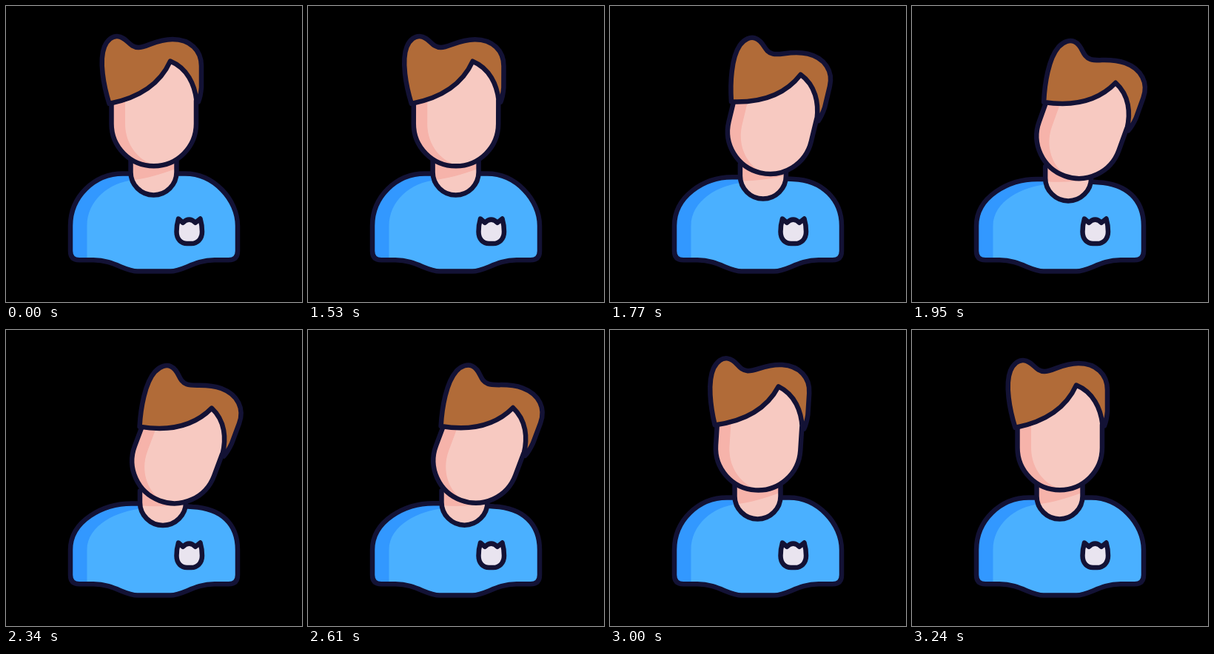
Write an HTML page that moves like this. It is 400 by 400 pixels and loops after 3270 ms.

```html
<!DOCTYPE html>
<html lang="en">
<head>
<meta charset="utf-8">
<title>Head tilt</title>
<style>
  html, body { margin: 0; width: 100%; height: 100%; overflow: hidden; background: #000; }
  svg { display: block; width: 100vw; height: 100vh; }
  .line { stroke: #131235; stroke-width: 6.5; stroke-linecap: round; stroke-linejoin: round; }
</style>
</head>
<body>
<svg viewBox="0 0 400 400">
  <defs>
    <clipPath id="shirtClip"><path id="shirtShape"/></clipPath>
    <clipPath id="neckClip"><path d="M168.5 205V224.5A31 31 0 0 0 230.5 224.5V205Z"/></clipPath>
    <clipPath id="faceClip"><path d="M142.5 110V159A57.25 57.25 0 0 0 257 159V128C252 100 240 80 222 69Z"/></clipPath>
  </defs>

  <path id="shirtFill" fill="#4ab0ff"/>
  <path id="shirtShade" fill="#3298ff" clip-path="url(#shirtClip)"/>
  <path id="shirtLine" class="line" fill="none"/>
  <path class="line" fill="#e9e4ef" d="M233 287.5L239 292.8Q247.5 284.5 256 292.8L262.5 287.5Q265 296 265 305C265 315.5 258 321 250.5 321H244.5C237 321 230.5 315.5 230.5 305Q230.5 296 233 287.5Z"/>

  <g id="neck">
    <path fill="#f7c9c1" d="M168.5 208V224.5A31 31 0 0 0 230.5 224.5V208Z"/>
    <g clip-path="url(#neckClip)">
      <path id="neckShade" fill="#f6b3aa" d="M150 190V237C180 236 210 229 248 212V190Z"/>
    </g>
    <path class="line" fill="none" d="M168.5 209V224.5A31 31 0 0 0 230.5 224.5V209"/>
  </g>

  <g id="head">
    <path fill="#f7c9c1" d="M142.5 110V159A57.25 57.25 0 0 0 257 159V128C252 100 240 80 222 69Z"/>
    <path fill="#f6b3aa" clip-path="url(#faceClip)" d="M140 100H161V159C161 188 180 211 205 216L190 225H140Z"/>
    <path class="line" fill="none" d="M142.5 128V159A57.25 57.25 0 0 0 257 159V128"/>
    <path class="line" fill="#b16b38" d="M139.5 132C132 108 125.5 74 133 55C137 45.5 144 40.5 150.5 41C164 42 166 56 179 56C190 56 203 45 225 45C249 45 264 60 264 81V110Q263 122 260 129.5L257.5 128C255 106 245 84 222 74.5C207 108 175 125 139.5 132Z"/>
  </g>
</svg>
<script>
  const LOOP = 3270, STEP = 30;
  const $ = id => document.getElementById(id);

  // Cubic-bezier ease (.33, 0, .4, 1), solved by bisection.
  function ease(x) {
    if (x <= 0) return 0;
    if (x >= 1) return 1;
    let lo = 0, hi = 1;
    for (let i = 0; i < 24; i++) {
      const s = (lo + hi) / 2, r = 1 - s;
      if (3 * r * r * s * .33 + 3 * r * s * s * .4 + s ** 3 < x) lo = s;
      else hi = s;
    }
    return lo * lo * (3 - 2 * lo);
  }

  // Lean to the right for `out` ms, then back for `length` ms from `start`.
  const lean = (t, out, start, length) =>
    ease((t - 1500) / out) - ease((t - start) / length);

  function shirtPath(n) {
    const lx = 158 + 12 * n, ly = 226.5 + 8 * n;
    const rx = 242 + 10 * n, ry = 226.5 + 12.5 * n;
    return `M87 331V297C87 258 ${lx - 39} ${ly} ${lx} ${ly}H${200 + 12 * n}L${rx - 12} ${ry - n}` +
      `L${rx} ${ry}C${rx + 39} ${ry + 2 * n} 313 262 313 297V331Q313 343.3 301 343.3H282` +
      `C254 343.3 240 358.5 222 358.5H178C160 358.5 146 343.3 118 343.3H99Q87 343.3 87 331Z`;
  }

  function draw(t) {
    const n = lean(t, 600, 2560, 450);
    const move = lean(t, 600, 2560, 500);
    const turn = lean(t, 550, 2655, 560);

    const d = shirtPath(n);
    for (const id of ["shirtShape", "shirtFill", "shirtLine"]) $(id).setAttribute("d", d);
    const sx = 174 + 12 * n, sy = 235 + 6 * n;
    $("shirtShade").setAttribute("d",
      `M80 360H109.5V297C109.5 264 ${sx - 36} ${sy + 3} ${sx} ${sy}V200H80Z`);

    $("neck").setAttribute("transform", `translate(${12.5 * n} ${8.5 * n})`);
    $("neckShade").setAttribute("transform", `rotate(${13 * n} 199 228)`);
    $("head").setAttribute("transform",
      `translate(${27.8 * move} ${17.9 * move}) rotate(${20.5 * turn} 199.5 159)`);
  }

  const begin = performance.now();
  function tick() {
    const t = (performance.now() - begin) % LOOP;
    draw(Math.floor(t / STEP) * STEP);
    requestAnimationFrame(tick);
  }
  tick();
</script>
</body>
</html>
```
